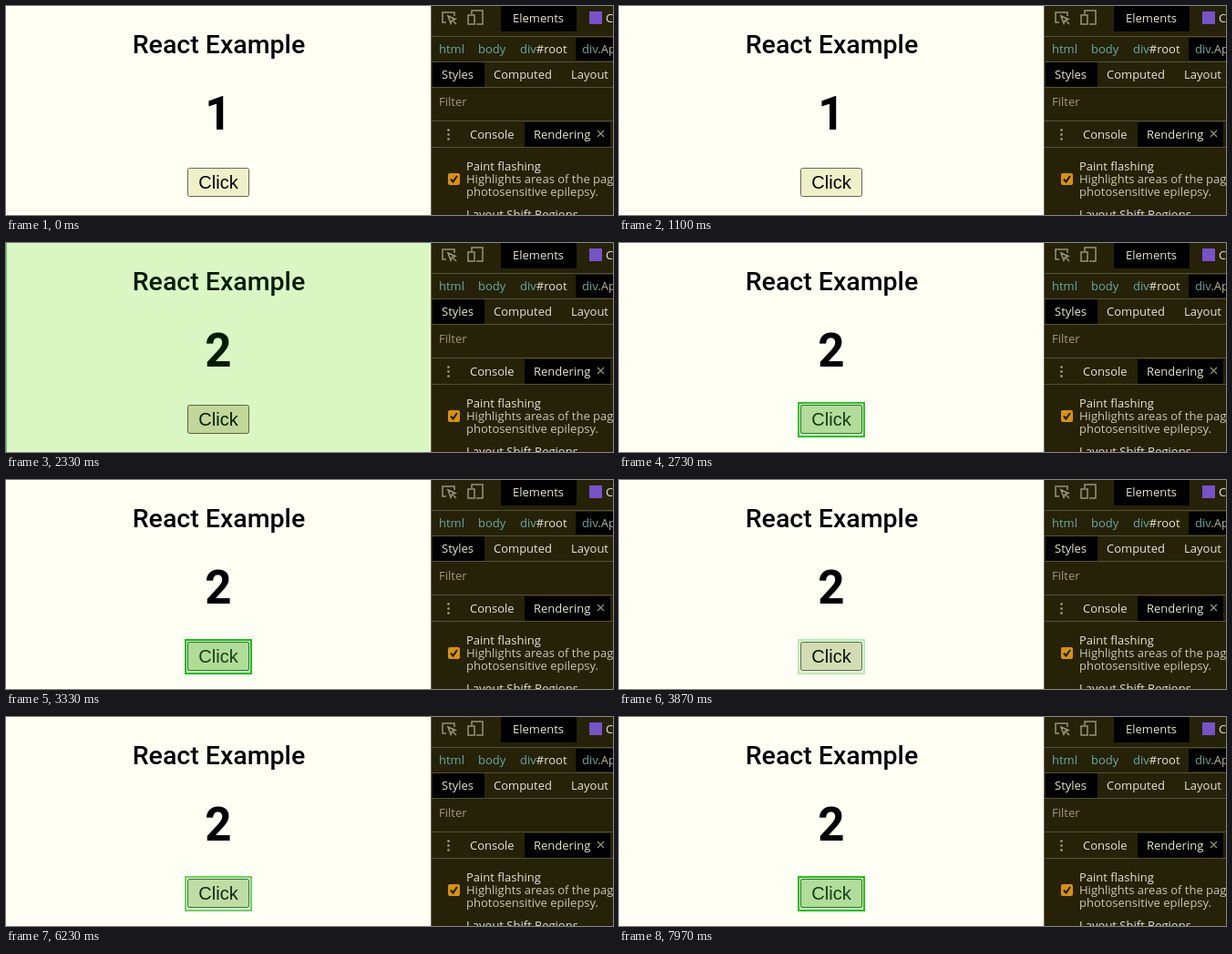
Animation, 666 px wide and 230 px high, one loop 8000 ms. Source, as an HTML page:

```html
<!DOCTYPE html>
<html lang="en">
<head>
<meta charset="utf-8">
<title>Paint flashing</title>
<style>
  html, body { margin: 0; width: 100%; height: 100%; overflow: hidden; background: #fffff4; }
  svg { display: block; width: 666px; height: 230px; }
  .heading { font: 500 28.5px Roboto, sans-serif; text-anchor: middle; }
  .count { font: 600 51px Roboto, sans-serif; text-anchor: middle; }
  .label { font: 20px "Liberation Sans", Arial, sans-serif; text-anchor: middle; }
  .tools { font: 13px "Open Sans", "Noto Sans", sans-serif; fill: #e8e6cf; }
  .tools .tag { fill: #68aaa0; }
  .tools .dim { fill: #a09a7c; }
  .tools .soft { fill: #cbc8ac; }
  .active { fill: #000; }
  .rule { stroke: #55513a; }
  .icon { fill: none; stroke: #98947a; stroke-width: 1.5; }
  .tint { mix-blend-mode: multiply; }
  .frame { fill: none; stroke: #10b80c; stroke-width: 2; }
  .wash { fill: #3cd73c; fill-opacity: .32; }
</style>
</head>
<body>
<svg viewBox="0 0 666 230">
  <rect width="467" height="230" fill="#fffff4"/>
  <rect id="button" x="199.5" y="178.5" width="67" height="31" rx="2" stroke="#686850"/>
  <rect id="tint" class="tint" width="466" height="230"/>

  <g id="renderFlash">
    <path class="frame" d="M0 27H465V209H0Z" stroke-opacity=".55"/>
    <rect class="wash" x="218" y="90" width="30" height="56"/>
    <rect class="frame" x="219" y="91" width="28" height="54"/>
  </g>
  <path id="edge" d="M.5 0V230" stroke="#30b040"/>

  <g id="ink">
    <text class="heading" x="233.5" y="52">React Example</text>
    <text class="count" id="count" x="233" y="136">1</text>
    <text class="label" x="233" y="201">Click</text>
  </g>

  <g id="buttonFlash">
    <rect class="wash" x="196" y="175" width="74" height="39"/>
    <rect class="frame" x="197" y="176" width="72" height="37"/>
    <rect x="199.5" y="178.5" width="67" height="31" rx="2" fill="none" stroke="#287828"/>
  </g>

  <g class="tools">
    <rect x="467" width="199" height="230" fill="#262208"/>
    <path d="M466.5 0V230" stroke="#66634c"/>
    <path class="active" d="M543 0h83v28h-83zM625 35h41v25h-41zM468 62h57v27h-57zM569 128h94v27h-94z"/>
    <path class="rule" d="M467 33.5H666M467 61.5H666M467 89.5H666M467 126.5H666M467 155.5H666"/>

    <path class="icon" d="M483 18h-4V7h13v4M485 11l8 3.5-3.5 1.2-1.5 3.5zM490 16l4 4"/>
    <path class="icon" d="M511 9V5h12v15h-7M507 10h7v10h-7z"/>
    <text x="556" y="18">Elements</text>
    <rect x="640" y="6" width="14" height="14" fill="#7852c8"/>
    <text x="658" y="18">Components</text>

    <text class="tag" x="475" y="52">html</text>
    <text class="tag" x="518" y="52">body</text>
    <text class="tag" x="564" y="52">div<tspan fill="#e8e6cf">#root</tspan></text>
    <text class="tag" x="632" y="52">div<tspan fill="#b8b498">.App</tspan></text>

    <text x="478" y="80">Styles</text>
    <text x="535" y="80">Computed</text>
    <text x="620" y="80">Layout</text>
    <text class="dim" x="475" y="110">Filter</text>

    <g fill="#a8a488">
      <circle cx="485.500" cy="136.500" r="1.300"/>
      <circle cx="485.500" cy="141.500" r="1.300"/>
      <circle cx="485.500" cy="146.500" r="1.300"/>
    </g>
    <text x="509" y="146">Console</text>
    <text x="579" y="146">Rendering</text>
    <path d="M649 137l7 7m0-7l-7 7" stroke="#98947a" stroke-width="1.2"/>

    <rect x="485" y="184" width="13" height="13" rx="2" fill="#d8920c"/>
    <path d="M488 190.500l2.500 3 4.500-6.500" fill="none" stroke="#201800" stroke-width="2"/>
    <text x="505" y="181">Paint flashing</text>
    <text class="soft" x="505" y="195">Highlights areas of the page</text>
    <text class="soft" x="505" y="209">photosensitive epilepsy.</text>
    <text x="505" y="234">Layout Shift Regions</text>
  </g>
</svg>
<script>
  const LOOP = 8000;
  const CLICK = 1800;
  const REPEAT_START = 2617;
  const REPEAT = 660;
  const byId = id => document.getElementById(id);
  const [button, tint, renderFlash, edge, ink, count, buttonFlash] =
    ['button', 'tint', 'renderFlash', 'edge', 'ink', 'count', 'buttonFlash'].map(byId);

  // Strength of a flash that starts at full and fades linearly.
  const fade = (time, start, length) =>
    time < start ? 0 : Math.max(0, 1 - (time - start) / length);

  const mix = (from, to, amount) =>
    `rgb(${from.map((c, i) => Math.round(c + (to[i] - c) * amount))})`;

  function draw(now) {
    const time = now % LOOP;
    const clicked = time >= CLICK;
    const page = fade(time, CLICK, 800);
    const render = Math.min(1, fade(time, CLICK, 480) * 1.2);
    const press = time < REPEAT_START
      ? render
      : 1 - 0.8 * ((time - REPEAT_START) % REPEAT) / REPEAT;

    count.textContent = clicked ? 2 : 1;
    button.setAttribute('fill', clicked ? '#e2dec0' : '#efefc8');
    tint.setAttribute('fill', mix([255, 255, 255], [146, 232, 104], page));
    ink.setAttribute('fill', mix([0, 0, 0], [0, 84, 0], page));
    edge.setAttribute('opacity', Math.min(1, page * 2));
    renderFlash.setAttribute('opacity', render);
    buttonFlash.setAttribute('opacity', press);
  }

  const start = performance.now();
  function tick() {
    draw(performance.now() - start);
    requestAnimationFrame(tick);
  }
  tick();
</script>
</body>
</html>
```
